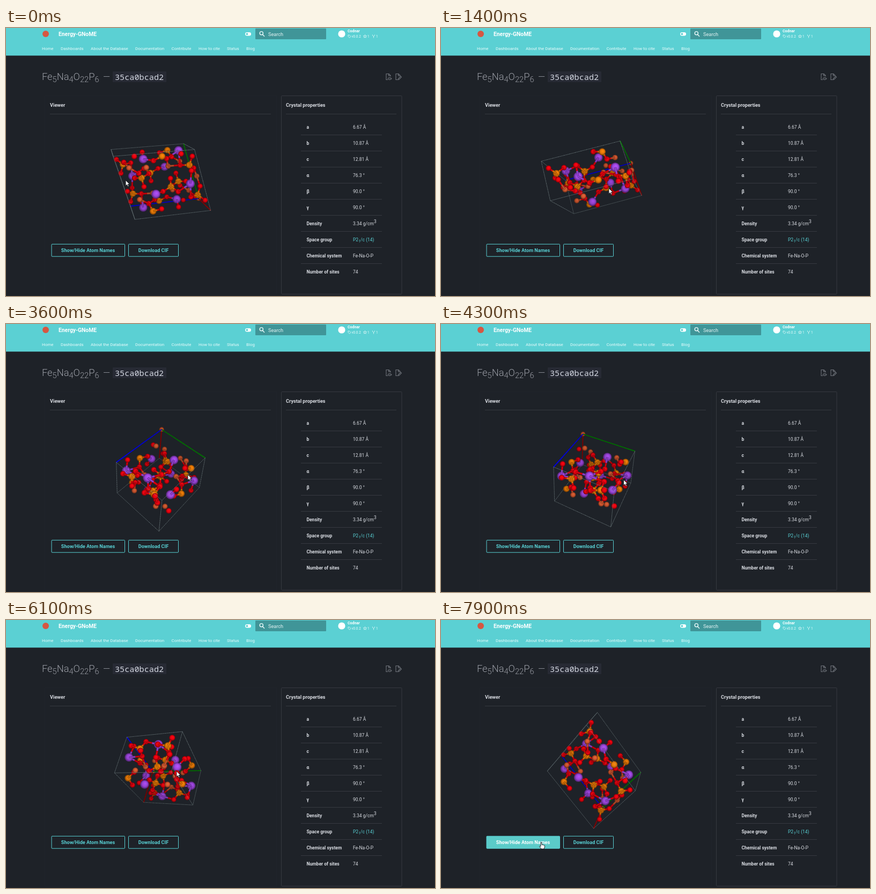
Write an HTML page with a canvas that moves like this. It is 800x500 px and loops after 8 s.

```html
<!DOCTYPE html>
<html lang="en">
<head>
<meta charset="utf-8">
<title>Crystal viewer</title>
<style>
html, body { margin: 0; width: 100%; height: 100%; overflow: hidden; background: #1e2228; }
svg, canvas { position: absolute; left: 0; top: 0; }
text { font: 8.5px Roboto, sans-serif; fill: #d9dce2; white-space: pre; }
.b { font-weight: 700; }
.nav text { font-size: 7.95px; fill: #e9fbfb; }
.head { font-size: 9.15px; font-weight: 700; }
.title { font-size: 18.3px; font-weight: 300; fill: #9b9ea6; }
.sub { font-size: 14.6px; }
.code { font: 15.2px "Noto Sans Mono", "DejaVu Sans Mono", monospace; fill: #d2d6e0; }
.line { fill: none; stroke: #363940; }
.icon { fill: none; stroke: #eafafa; }
.btn rect { fill: none; stroke: #58cfd3; }
.btn text { font-size: 9.15px; font-weight: 700; fill: #58cfd3; text-anchor: middle; }
.hover rect { fill: #5bcbc9; }
.hover text { fill: #fff; }
</style>
</head>
<body>
<svg width="800" height="500">
  <rect width="800" height="51.5" fill="#5bd0d3"/>
  <circle cx="74" cy="11" r="6" fill="#d65742"/>
  <text class="b" x="98" y="14.5" style="font-size:10.35px;fill:#fff">Energy-GNoME</text>
  <g class="nav">
    <text x="67" y="41">Home</text><text x="102" y="41">Dashboards</text>
    <text x="158" y="41">About the Database</text><text x="241" y="41">Documentation</text>
    <text x="308.5" y="41">Contribute</text><text x="359" y="41">How to cite</text>
    <text x="412" y="41">Status</text><text x="448" y="41">Blog</text>
  </g>
  <rect x="446" y="8" width="11" height="6.4" rx="3.2" fill="#fff"/>
  <circle cx="449.4" cy="11.2" r="1.9" fill="#5bd0d3"/>
  <rect x="465" y="1" width="132" height="20" rx="1" fill="#409598"/>
  <path class="icon" stroke-width="1.4" d="M478.5 12.2L482 15.7M479.4 9.7a3.1 3.1 0 1 1-6.2 0a3.1 3.1 0 1 1 6.2 0"/>
  <text x="489" y="14.5" style="font-size:9.15px;fill:#e4f3f3">Search</text>
  <circle cx="626" cy="11" r="6.6" fill="#fff"/>
  <text class="b" x="637" y="8.4" style="font-size:7px;fill:#fff">Codnar</text>
  <g class="nav">
    <text x="644.5" y="18" style="font-size:6.4px">v0.0.2</text>
    <text x="674" y="18" style="font-size:6.4px">1</text><text x="690" y="18" style="font-size:6.4px">1</text>
  </g>
  <path class="icon" stroke-width=".8" d="M638 13.2h2.6l2.4 2.6-2.4 2.4-2.6-2.6ZM669.5 12.6l.9 1.9 2 .2-1.5 1.4.4 2-1.8-1-1.8 1 .4-2-1.5-1.4 2-.2ZM683.5 12.5v1.5l2 1.5 2-1.5v-1.5M685.5 15.5v3"/>

  <text class="title" x="67" y="97">Fe<tspan class="sub" dy="4">5</tspan><tspan dy="-4">Na</tspan><tspan class="sub" dy="4">4</tspan><tspan dy="-4">O</tspan><tspan class="sub" dy="4">22</tspan><tspan dy="-4">P</tspan><tspan class="sub" dy="4">6</tspan></text>
  <text class="title" x="181" y="97" style="font-size:17px">—</text>
  <rect x="199" y="81" width="100" height="20" rx="1" fill="#272a34"/>
  <text class="code" x="203" y="97">35ca0bcad2</text>
  <g fill="none" stroke="#70747b" stroke-width="1.1">
    <path d="M712 96.5h-3v-11h5l3 3v2M713.5 85.5v3.5h3.5M712 94.5q3-4 7 0q-4 4-7 0M715 94.5h1"/>
    <path d="M730 96.5h-3v-11h5l3 3v1M731.5 85.5v3.5h3.5M731 96.5l.5-2 4.5-4.5 1.5 1.5-4.5 4.5Z"/>
  </g>

  <rect class="line" x="72.5" y="126.5" width="432" height="370" style="stroke:#20242b"/>
  <rect class="line" x="513.5" y="126.5" width="224.5" height="370" rx="1"/>
  <path class="line" d="M82 160.5H494M522 160.5H728"/>
  <text class="head" x="82" y="146.5">Viewer</text>
  <text class="head" x="522" y="146.5">Crystal properties</text>
  <g id="table"></g>
  <g class="btn" id="toggle"><rect x="85" y="403.3" width="136.5" height="22.9" rx="1"/><text x="153" y="418.3">Show/Hide Atom Names</text></g>
  <g class="btn"><rect x="228.5" y="403.3" width="93" height="22.9" rx="1"/><text x="275" y="418.3">Download CIF</text></g>
</svg>
<canvas id="view" width="800" height="500"></canvas>
<script>
const rows = { a: '6.67 Å', b: '10.87 Å', c: '12.81 Å', α: '76.3 °', β: '90.0 °', γ: '90.0 °',
  Density: '3.34 g/cm<tspan dy="-4">3</tspan>',
  'Space group': '<tspan fill="#58cfd3">P2<tspan dy="2" font-size="7">1</tspan><tspan dy="-2">/c (14)</tspan></tspan>',
  'Chemical system': 'Fe-Na-O-P', 'Number of sites': '74' };
document.getElementById('table').innerHTML = Object.entries(rows).map(([name, value], i) => {
  const y = 188 + 30 * i;
  return (i ? `<path class="line" d="M550 ${y - 18.5}H701"/>` : '') +
    `<text class="b" x="560.5" y="${y}">${name}</text><text x="647" y="${y}">${value}</text>`;
}).join('');

const ctx = document.getElementById('view').getContext('2d');
const toggle = document.getElementById('toggle');
const CX = 288, CY = 283, EYE = 600;

// Unit cell: 11 px per Å, with the angle alpha between b and c.
const A = 73.4, B = 119.6, C = 141, ALPHA = 76.3 * Math.PI / 180;
const CB = C * Math.cos(ALPHA), CZ = C * Math.sin(ALPHA);
const toCell = ([p, q, r]) => [p * A, q * B + r * CB, r * CZ];
const toFraction = ([x, y, z]) => [x / A, (y - z / CZ * CB) / B, z / CZ];

const mix = (a, b, k) => a.map((v, i) => v + (b[i] - v) * k);
const combine = (m, s) => [0, 1, 2].map(i => s[0] * m[0][i] + s[1] * m[1][i] + s[2] * m[2][i]);
const wrap = x => x - Math.floor(x + .5);
const distance = (a, b) => Math.hypot(...a.map((v, i) => v - b[i]));
const tint = (rgb, k) => `rgb(${rgb.map(v => Math.min(255, v * k) | 0)})`;

// Three perpendicular axes: the first from heading and tilt, the second turned about it by spin.
function axes(heading, tilt, spin) {
  const [h, e, s] = [heading, tilt, spin].map(d => d * Math.PI / 180);
  const u = [Math.cos(e) * Math.cos(h), Math.cos(e) * Math.sin(h), Math.sin(e)];
  const side = [-Math.sin(h), Math.cos(h), 0];
  const rise = [-Math.sin(e) * Math.cos(h), -Math.sin(e) * Math.sin(h), Math.cos(e)];
  const turn = (x, y) => side.map((v, i) => v * x + rise[i] * y);
  return [u, turn(Math.cos(s), Math.sin(s)), turn(Math.sin(s), -Math.cos(s))];
}

const kinds = {
  Fe: { rgb: [208, 88, 48], r: 5.1, reach: 24 },
  Na: { rgb: [160, 72, 226], r: 8, reach: 27 },
  P: { rgb: [236, 124, 8], r: 6.2, reach: 21 },
  O: { rgb: [234, 4, 16], r: 5, reach: 0 }
};
// Independent sites, as fractions measured from the cell centre.
const sites = {
  Fe: [[.2, .268, .357], [-.01, .21, -.155]],
  Na: [[-.41, .041, .34], [-.48, .137, -.14]],
  P: [[-.26, .268, .413], [-.4, .425, -.24], [.26, .41, -.093]],
  O: []
};
// Each P holds a tetrahedron of O; neighbouring tetrahedra may share a corner.
const turns = [[202, 63, 227], [-74, 41, 165], [-26, 36, -31]];
sites.P.forEach((centre, i) => {
  for (const corner of [[1, 1, 1], [1, -1, -1], [-1, 1, -1], [-1, -1, 1]]) {
    const offset = toFraction(combine(axes(...turns[i]), corner.map(v => v * 9.8)));
    const site = centre.map((v, k) => v + offset[k]);
    const shared = o => Math.hypot(...toCell(site.map((v, k) => wrap(v - o[k])))) < 6;
    if (!sites.O.some(shared)) sites.O.push(site);
  }
});

const atoms = [];
const addAtom = (kind, site) => atoms.push({ ...kinds[kind], kind, pos: toCell(site.map(wrap)) });
const screw = ([p, q, r]) => [p + .5, .5 - q, -r];
const invert = s => s.map(v => -v);
for (const kind in sites) for (const s of sites[kind])
  for (const copy of [s, screw(s), invert(s), invert(screw(s))]) addAtom(kind, copy);
const origin = [-.5, -.5, -.5];
addAtom('Fe', origin);
addAtom('Fe', screw(origin));

const sticks = [];
for (const m of atoms) for (const o of atoms)
  if (o.kind == 'O' && distance(m.pos, o.pos) < m.reach) {
    const mid = mix(m.pos, o.pos, .5);
    sticks.push([m.pos, mid, m.rgb], [o.pos, mid, o.rgb]);
  }

// Cell edges in short pieces, so that they sort by depth among the atoms.
const edges = [];
const axisRgb = [[150, 0, 0], [0, 120, 0], [0, 0, 225]];
for (let axis = 0; axis < 3; axis++) for (let n = 0; n < 4; n++) {
  const start = origin.slice();
  start[(axis + 1) % 3] += n & 1;
  start[(axis + 2) % 3] += n >> 1;
  const end = start.slice();
  end[axis] += 1;
  for (let i = 0; i < 14; i++)
    edges.push([toCell(mix(start, end, i / 14)), toCell(mix(start, end, (i + 1) / 14)), n ? [120, 134, 136] : axisRgb[axis], !n]);
}

// time, pointer x and y, then heading, tilt and spin of the crystal
const keys = [
  [0, 223, 284, 52, 72, 110],
  [1400, 313, 299, 74, 20, 80],
  [2700, 271, 257, 73, 5, 79],
  [3600, 339, 281, 95, -40, 135],
  [5500, 343, 307, 90, -21, 173],
  [6700, 293, 257, 122, 65, 109],
  [7300, 278, 284, 120, 60, 102],
  [7800, 187, 415, 120, 60, 102],
  [8000, 187, 415, 120, 60, 102]
];
function stateAt(t) {
  const i = keys.findIndex(k => k[0] > t), from = keys[i - 1], to = keys[i];
  return mix(from, to, (t - from[0]) / (to[0] - from[0])).slice(1);
}

function sphere(p, atom, light) {
  const r = atom.r * p.f;
  const g = ctx.createRadialGradient(p.x + r * .15, p.y - r * .2, r * .1, p.x, p.y, r);
  g.addColorStop(0, tint(atom.rgb, light * 1.08));
  g.addColorStop(.55, tint(atom.rgb, light * .93));
  g.addColorStop(1, tint(atom.rgb, light * .48));
  ctx.fillStyle = g;
  ctx.beginPath();
  ctx.arc(p.x, p.y, r, 0, 7);
  ctx.fill();
}
function stroke(p, q, style, width, dash = []) {
  ctx.strokeStyle = style;
  ctx.lineWidth = width;
  ctx.setLineDash(dash);
  ctx.beginPath();
  ctx.moveTo(p.x, p.y);
  ctx.lineTo(q.x, q.y);
  ctx.stroke();
}

function drawCrystal(turn) {
  const m = axes(...turn), items = [];
  const project = s => {
    const [x, y, z] = combine(m, s), f = EYE / (EYE - z);
    return { x: CX + x * f, y: CY + y * f, z, f };
  };
  const light = z => Math.min(1.05, .96 + z / 500);
  for (const a of atoms) {
    const p = project(a.pos);
    items.push([p.z, () => sphere(p, a, light(p.z))]);
  }
  for (const [s, e, rgb] of sticks) {
    const p = project(s), q = project(e), z = (p.z + q.z) / 2;
    items.push([z, () => {
      stroke(p, q, tint(rgb, light(z) * .6), 3.6 * p.f);
      stroke(p, q, tint(rgb, light(z) * .9), 2 * p.f);
    }]);
  }
  for (const [s, e, rgb, isAxis] of edges) {
    const p = project(s), q = project(e), z = (p.z + q.z) / 2;
    items.push([z, () => stroke(p, q, tint(rgb, light(z)), isAxis ? 1.9 : .75, isAxis ? [] : [1.5, .8])]);
  }
  items.sort((a, b) => a[0] - b[0]).forEach(i => i[1]());
}

const arrow = new Path2D('M0 0V10.5L2.5 8.2 4.2 12 6 11.2 4.3 7.5H7.6Z');
const hand = new Path2D('M-1 0Q0-1 1 0V4.5Q2 3.5 3 4.7Q4 4 4.8 5.2Q6 4.7 6.3 6V9L5 12H0L-3.5 7.5Q-3.5 6-1 7.5Z');
function drawPointer(x, y, shape) {
  ctx.save();
  ctx.translate(x, y);
  ctx.setLineDash([]);
  ctx.fillStyle = '#fff';
  ctx.strokeStyle = '#15171c';
  ctx.lineWidth = .9;
  ctx.fill(shape);
  ctx.stroke(shape);
  ctx.restore();
}

function frame(now) {
  const [x, y, ...turn] = stateAt(now % 8000);
  const over = x > 84 && x < 222 && y > 403 && y < 427;
  toggle.classList.toggle('hover', over);
  ctx.clearRect(0, 0, 800, 500);
  drawCrystal(turn);
  drawPointer(x, y, over ? hand : arrow);
  requestAnimationFrame(frame);
}
requestAnimationFrame(frame);
</script>
</body>
</html>
```
